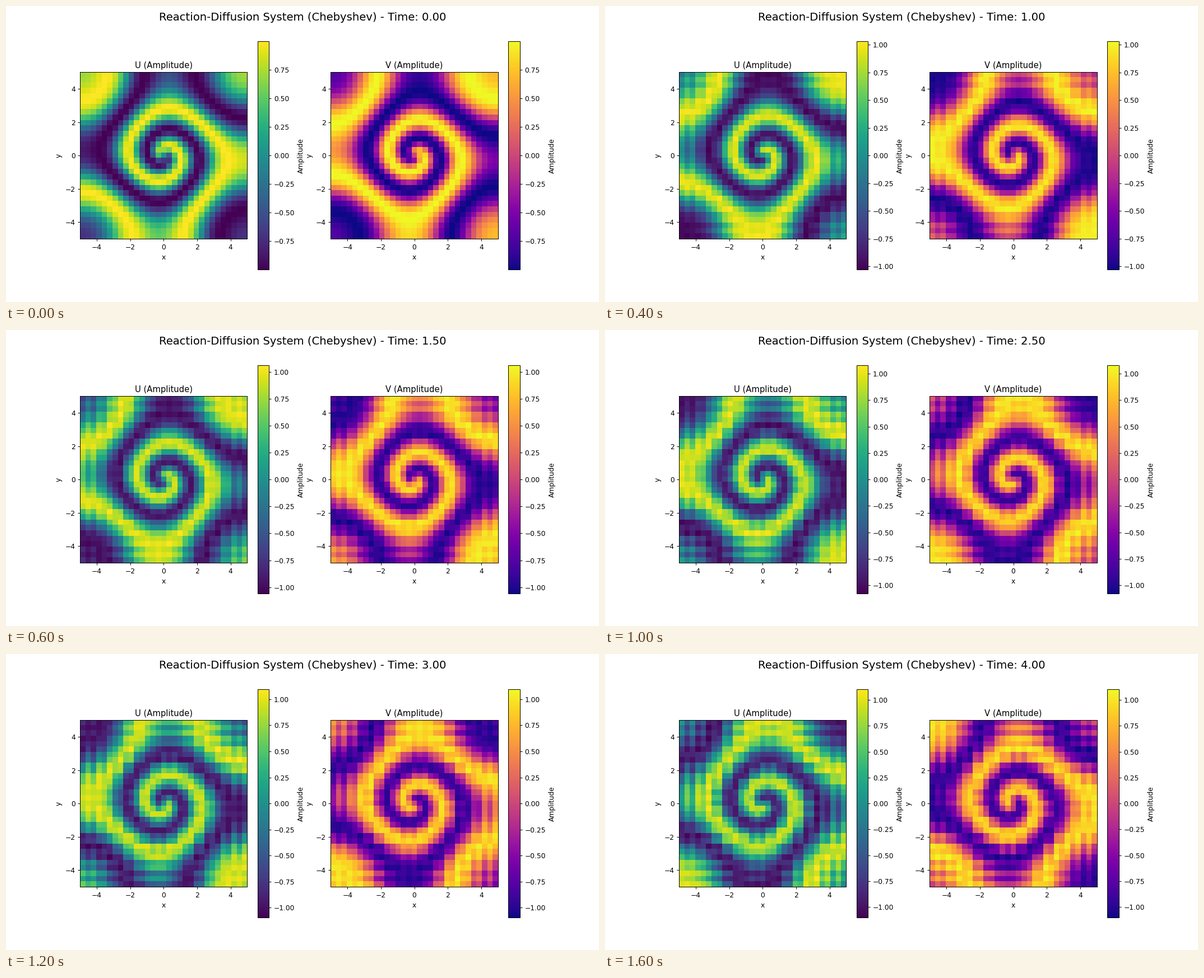
Recreate the animation shown at these times as a matplotlib script. Size 1058 by 529 pixels, loop 1.8 s.

```python
import numpy as np
import matplotlib.pyplot as plt
from matplotlib.animation import FuncAnimation

N = 30
HALF_WIDTH = 10
DIFFUSION = 0.1
BETA = 1.0
FRAMES = 9
FRAME_TIME = 0.5
STEPS = 100  # Runge-Kutta steps per frame


def chebyshev(n):
    """Chebyshev differentiation matrix and its points on [-1, 1]."""
    k = np.arange(n + 1)
    x = np.cos(np.pi * k / n)
    c = np.where((k == 0) | (k == n), 2.0, 1.0) * (-1.0) ** k
    d = np.outer(c, 1 / c) / (x[:, None] - x + np.eye(n + 1))
    return d - np.diag(d.sum(axis=1)), x


def no_flux_second_derivative(d):
    d = d.copy()
    d[[0, -1]] = 0
    return d @ d / HALF_WIDTH**2


D, points = chebyshev(N)
DXX = no_flux_second_derivative(D)


def rate(w):
    """Lambda-omega reaction with diffusion, for w = u + iv."""
    a2 = np.abs(w) ** 2
    laplacian = DXX @ w + w @ DXX.T
    return (1 - a2 - 1j * BETA * a2) * w + DIFFUSION * laplacian


def advance(w):
    h = FRAME_TIME / STEPS
    for _ in range(STEPS):
        k1 = rate(w)
        k2 = rate(w + h / 2 * k1)
        k3 = rate(w + h / 2 * k2)
        k4 = rate(w + h * k3)
        w = w + h / 6 * (k1 + 2 * k2 + 2 * k3 + k4)
    return w


def spiral():
    x, y = np.meshgrid(HALF_WIDTH * points, HALF_WIDTH * points)
    r = np.hypot(x, y)
    return np.tanh(r) * np.exp(1j * (np.arctan2(y, x) - r))


states = [spiral()]
while len(states) < FRAMES:
    states.append(advance(states[-1]))

plt.rcParams["font.family"] = "DejaVu Sans"
fig, axes = plt.subplots(1, 2, figsize=(12, 6), dpi=1058 / 12)
title = fig.suptitle("", fontsize=16)


def add_panel(ax, name, data, cmap):
    image = ax.imshow(data, cmap=cmap, extent=[-5, 5, -5, 5])
    ax.set(title=f"{name} (Amplitude)", xlabel="x", ylabel="y")
    fig.colorbar(image, ax=ax, label="Amplitude")
    return image


u_image = add_panel(axes[0], "U", states[0].real, "viridis")
v_image = add_panel(axes[1], "V", states[0].imag, "plasma")


def update(frame):
    w = states[frame]
    for image, data in ((u_image, w.real), (v_image, w.imag)):
        image.set_data(data)
        image.set_clim(data.min(), data.max())
    title.set_text(
        f"Reaction-Diffusion System (Chebyshev) - Time: {frame * FRAME_TIME:.2f}"
    )
    return u_image, v_image, title


anim = FuncAnimation(fig, update, frames=FRAMES, interval=200, repeat=True)
plt.show()
```
